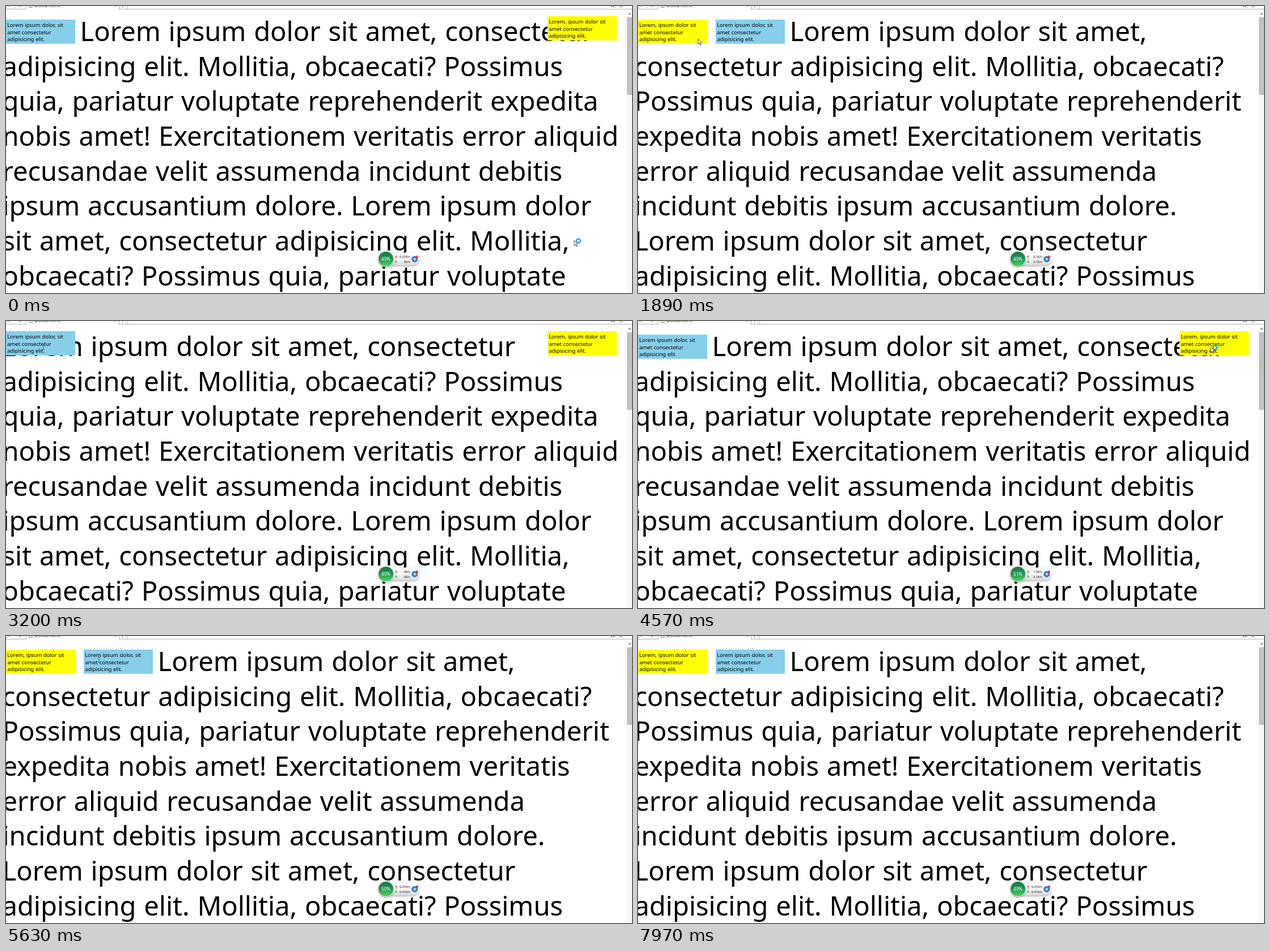
An HTML page with a canvas for the animation above (8000 ms loop, 1104 by 507 pixels).

```html
<!DOCTYPE html>
<html lang="en">
<head>
<meta charset="utf-8">
<title>Document</title>
<style>
  html, body { margin: 0; width: 1104px; height: 507px; overflow: hidden; background: #fff; }
  canvas { display: block; }
</style>
</head>
<body>
<canvas width="1104" height="507"></canvas>
<script>
const LOOP = 8000;
const ctx = document.querySelector('canvas').getContext('2d');
const FAMILY = '"Noto Sans", "Open Sans", sans-serif';

const passage = 'Lorem ipsum dolor sit amet, consectetur adipisicing elit. Mollitia, obcaecati? ' +
  'Possimus quia, pariatur voluptate reprehenderit expedita nobis amet! Exercitationem veritatis ' +
  'error aliquid recusandae velit assumenda incidunt debitis ipsum accusantium dolore. ';
const words = passage.repeat(2).trim().split(' ');

// Box positions and the indent of the first line in each layout
const layouts = {
  pinned: { blue: [0, 24], yellow: [955, 18], indent: 137 },
  inline: { blue: [137, 24], yellow: [0, 24], indent: 274 },
  overlap: { blue: [0, 18], yellow: [955, 18], indent: 0 }
};
const layoutTimes = [
  [0, 'pinned'], [1160, 'inline'], [2250, 'pinned'], [2690, 'overlap'],
  [3390, 'pinned'], [4700, 'inline']
];

// Time, load, upload, download
const meterTimes = [
  [0, 49, '0.01', '0'], [60, 48, '0.01', '0'], [700, 49, '0.01', '0.01'],
  [1650, 49, '0.1', '0.1'], [2600, 49, '0', '0'], [3720, 51, '1.5', '0.1'],
  [4700, 49, '0.07', '0.07'], [5630, 50, '0.01', '0.01'], [6410, 51, '0.01', '0.01'],
  [7260, 49, '0.01', '0.01']
];

// Pointer moves: start, end, x, y, shape
const moves = [
  [0, 0, 1002, 414, 'busy'], [30, 90, 979, 172, 'busy'], [350, 830, 968, 24, 'busy'],
  [1090, 1460, 420, 62, 'arrow'], [1650, 1890, 106, 58, 'arrow'], [2080, 2500, 50, 53, 'beam'],
  [3080, 3200, 66, 46, 'beam'], [3720, 4300, 980, 46, 'beam'], [4300, 4440, 1010, 46, 'busy'],
  [4600, 5080, 164, 42, 'beam'], [6350, 6470, 188, 58, 'beam'], [7850, 7970, 750, 350, 'beam']
];

const latest = (list, t) => list.filter(item => item[0] <= t).pop();

function setFont(size) {
  ctx.font = `${size}px ${FAMILY}`;
  ctx.wordSpacing = `${size * 0.034}px`;
  ctx.letterSpacing = `${size * -0.0013}px`;
}

function text(str, x, y, size, color = '#000', align = 'left') {
  setFont(size);
  ctx.fillStyle = color;
  ctx.textAlign = align;
  ctx.fillText(str, x, y);
}

function rect(x, y, w, h, color) {
  ctx.fillStyle = color;
  ctx.fillRect(x, y, w, h);
}

function disc(x, y, r, color) {
  ctx.fillStyle = color;
  ctx.beginPath();
  ctx.arc(x, y, r, 0, 2 * Math.PI);
  ctx.fill();
}

function path(points, fill, stroke) {
  ctx.beginPath();
  points.forEach(p => ctx.lineTo(...p));
  ctx.closePath();
  ctx.fillStyle = fill;
  ctx.fill();
  if (stroke) {
    ctx.strokeStyle = stroke;
    ctx.lineWidth = 0.8;
    ctx.stroke();
  }
}

function gradient(y0, y1, ...colors) {
  const g = ctx.createLinearGradient(0, y0, 0, y1);
  colors.forEach((c, i) => g.addColorStop(i / (colors.length - 1), c));
  return g;
}

function drawPassage(indent) {
  const left = -6.5, right = 1090, size = 47.2, pitch = 61.65;
  setFont(size);
  let line = '', x = left + indent, y = 62;
  for (const word of words) {
    const next = line ? line + ' ' + word : word;
    if (x + ctx.measureText(next).width > right) {
      text(line, x, y, size);
      line = word;
      x = left;
      y += pitch;
      if (y > 507) return;
    } else line = next;
  }
  text(line, x, y, size);
}

function drawBox([x, y], color, heading) {
  rect(x, y, 122, 42.8, color);
  [heading, 'amet consectetur', 'adipisicing elit.']
    .forEach((line, i) => text(line, x + 2.2, y + 13.2 + i * 12.33, 9.44));
}

function drawBrowser() {
  rect(0, 5, 35, 1, '#b4b4b4');
  rect(213, 5, 891, 1, '#b4b4b4');
  rect(35, 0, 1, 6, '#b4b4b4');
  rect(199, 0, 1, 6, '#b4b4b4');
  rect(213, 0, 1, 6, '#b4b4b4');
  rect(200, 5, 13, 1, '#b4b4b4');
  rect(2, 0, 4, 1, '#999');
  rect(22, 0, 5, 1, '#999');
  rect(40.5, 0, 6, 3, '#888');
  rect(41.5, 0, 4, 2, '#fff');
  text('Document', 50, 2, 9.4, '#444');
  rect(191, 0, 3, 1, '#999');
  rect(205, 0, 1, 3, '#888');
  rect(1066, 1, 4, 1, '#777');
  rect(1071, 0, 2, 2, '#777');
  rect(1082, 1, 5, 1, '#777');

  rect(1095, 7, 9, 500, '#f8f8f8');
  rect(1095, 20, 9, 137, '#c1c1c1');
  path([[1097, 15], [1100, 12], [1103, 15]], '#888');
}

function drawMeter([, load, up, down]) {
  ctx.save();
  ctx.shadowColor = 'rgba(0,0,0,.35)';
  ctx.shadowBlur = 3;
  ctx.shadowOffsetY = 1;
  ctx.fillStyle = gradient(435, 459, '#fff', '#f4f4f4', '#d9d9d9');
  ctx.beginPath();
  ctx.roundRect(662, 435.5, 67, 23, 11.5);
  ctx.fill();
  disc(670, 447, 14, '#e4ebe5');
  ctx.restore();
  disc(670, 447, 13, gradient(434, 460, '#1c7647', '#239653', '#4bd75f'));
  text(load + '%', 670, 449.8, 8, '#fff', 'center');

  path([[686, 443], [688, 440.5], [690, 443]], '#e0453c');
  rect(687.5, 443, 1, 3, '#e0453c');
  path([[686, 451.5], [688, 454], [690, 451.5]], '#2c9a55');
  rect(687.5, 448.5, 1, 3, '#2c9a55');
  text(up + 'K/s', 713, 445, 5.5, '#111', 'right');
  text(down + 'K/s', 713, 453.5, 5.5, '#111', 'right');

  disc(720.8, 447.2, 5.5, '#2f76cf');
  rect(718, 446.6, 5.6, 1.2, '#fff');
  rect(720.2, 444.4, 1.2, 5.6, '#fff');
  disc(724.5, 443.2, 2.3, '#ee2b2b');
}

function drawPointer(t) {
  const i = moves.findLastIndex(m => m[0] <= t);
  const [start, end, x1, y1, shape] = moves[i];
  const [, , x0, y0] = moves[Math.max(0, i - 1)];
  const k = end > start ? Math.min(1, (t - start) / (end - start)) : 1;
  ctx.save();
  ctx.translate(x0 + (x1 - x0) * k, y0 + (y1 - y0) * k);
  if (shape === 'beam') {
    rect(-0.4, -4.5, 0.9, 9, '#555');
    rect(-2, -5, 4, 0.8, '#666');
    rect(-2, 4.2, 4, 0.8, '#666');
  } else {
    path([[0, 0], [0, 9.5], [2.1, 7.6], [3.7, 11], [5.1, 10.3], [3.6, 7], [6.4, 6.8]], '#fff', '#333');
    if (shape === 'busy') {
      ctx.strokeStyle = '#2a9ce8';
      ctx.lineWidth = 2.2;
      ctx.beginPath();
      ctx.arc(7.4, 1, 3.6, 0, 2 * Math.PI);
      ctx.stroke();
    }
  }
  ctx.restore();
}

function draw(now) {
  const t = now % LOOP;
  const layout = layouts[latest(layoutTimes, t)[1]];
  rect(0, 0, 1104, 507, '#fff');
  drawPassage(layout.indent);
  drawBox(layout.blue, '#87ceeb', 'Lorem ipsum dolor, sit');
  drawBox(layout.yellow, '#ff0', 'Lorem, ipsum dolor sit');
  drawBrowser();
  drawMeter(latest(meterTimes, t));
  drawPointer(t);
}

const begin = performance.now();
function tick() {
  draw(performance.now() - begin);
  requestAnimationFrame(tick);
}
tick();
</script>
</body>
</html>
```
